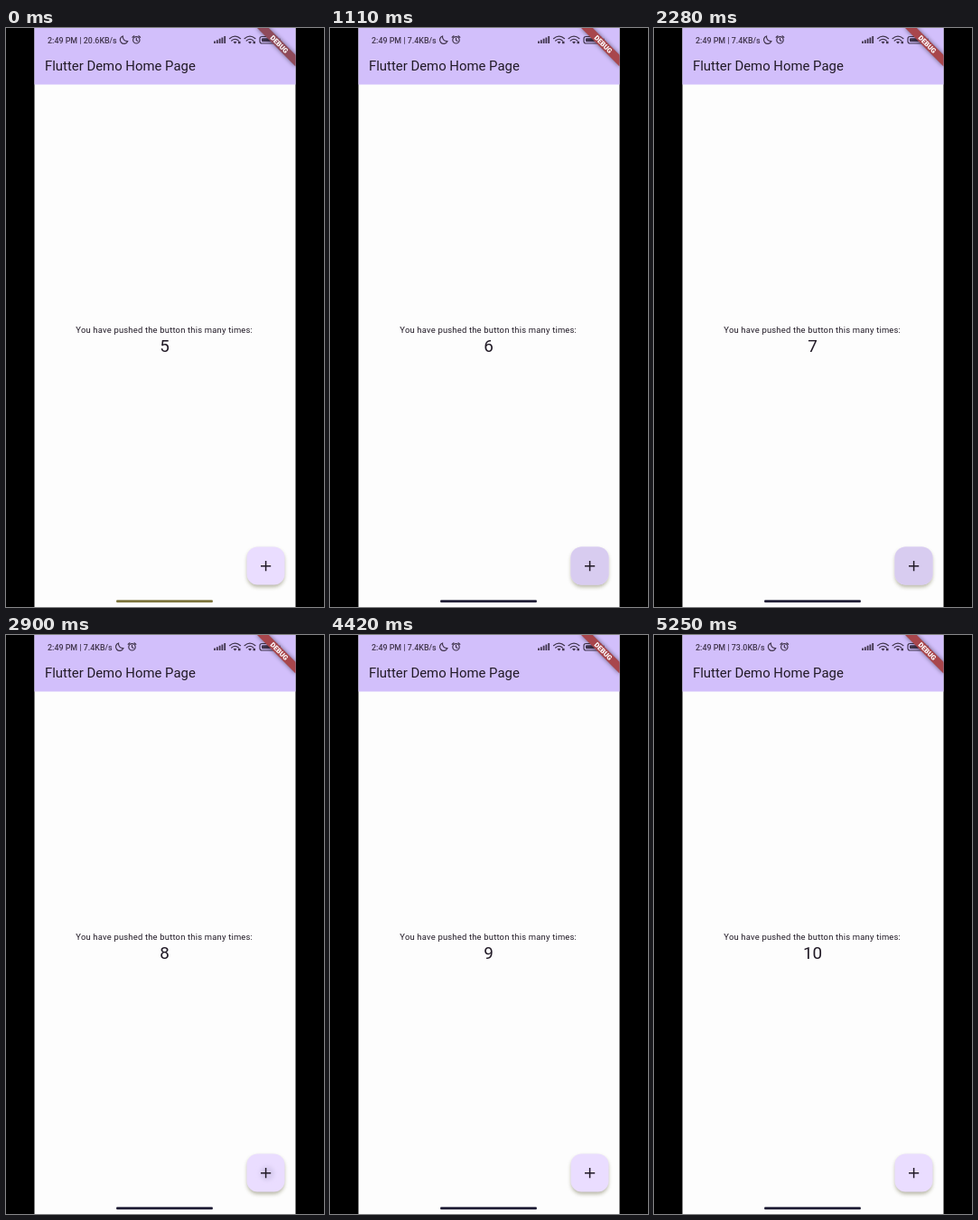
Animation, 352 px wide and 640 px high, one loop 5320 ms. Source, as an HTML page:

```html
<!DOCTYPE html>
<html lang="en">
<head>
<meta charset="utf-8">
<title>Counter demo</title>
<style>
html, body { margin: 0; width: 100%; height: 100%; overflow: hidden; background: #000; }
svg { display: block; width: 100vw; height: 100vh; font-family: Roboto, sans-serif; fill: #211a26; }
.line { fill: none; stroke: #41354d; stroke-width: 1.2; stroke-linecap: round; }
.bars { fill: none; stroke: #41354d; stroke-width: 1.8; }
.icon { fill: #41354d; }
</style>
</head>
<body>
<svg viewBox="0 0 352 640">
  <defs>
    <clipPath id="screen"><rect x="31.500" width="289" height="640"/></clipPath>
    <clipPath id="button"><rect x="266.500" y="573.500" width="42" height="42" rx="12"/></clipPath>
    <filter id="soft" x="-50%" y="-50%" width="200%" height="200%"><feGaussianBlur stdDeviation="2.2"/></filter>
    <filter id="glow" x="-50%" y="-150%" width="200%" height="400%"><feGaussianBlur stdDeviation="2.5"/></filter>
    <g id="wifi">
      <path class="line" d="M-6-3.600Q0-8.600 6-3.600M-3.800-1.300Q0-4.400 3.800-1.300"/>
      <path class="icon" d="M-2 .2Q0-1.400 2 .2L0 2.200ZM3.500-.5h2.500v2.500h-2.500z"/>
    </g>
  </defs>
  <rect width="352" height="640" fill="#000"/>
  <g clip-path="url(#screen)">
    <rect x="31" width="290" height="640" fill="#fdfdfd"/>
    <rect x="31" width="290" height="62.500" fill="#d2bffb"/>

    <text x="43" y="47.300" font-size="14.900">Flutter Demo Home Page</text>
    <text x="175.200" y="337" font-size="9.430" letter-spacing=".19" text-anchor="middle">You have pushed the button this many times:</text>
    <text id="count" x="175.500" y="358.200" font-size="18.900" text-anchor="middle"></text>

    <text id="status" class="icon" x="46" y="16.500" font-size="8.900" font-weight="500"></text>
    <g id="alerts">
      <path class="line" d="M4 9A4.300 4.300 0 1 0 9.300 14.700A5 5 0 0 1 4 9Z"/>
      <circle class="line" cx="19" cy="13.300" r="3.700"/>
      <path class="line" d="M19 11.300V13.500L20.500 14.400M14.700 10.300L16.500 8.800M23.300 10.300L21.500 8.800"/>
    </g>
    <path class="bars" d="M231 17V14.500M233.800 17V13.200M236.600 17V11.800M239.400 17V10.400M242.200 17V9"/>
    <use href="#wifi" x="253.500" y="15.300"/>
    <use href="#wifi" x="270" y="15.300"/>
    <rect class="line" x="281" y="9.500" width="19.500" height="7.500" rx="2.200"/>
    <rect class="icon" x="283" y="11.300" width="11.500" height="4" rx="1"/>
    <path class="line" d="M303 12V14.500"/>

    <!-- Ribbon across the top right corner -->
    <g transform="translate(320.500 0) rotate(45)">
      <rect x="-30" y="21" width="60" height="9" opacity=".5" fill="#000" filter="url(#glow)"/>
      <rect id="banner" x="-30" y="21" width="60" height="9"/>
      <text y="28.200" font-size="7.600" font-weight="900" text-anchor="middle" fill="#fff">DEBUG</text>
    </g>

    <rect x="267" y="576" width="41" height="42" rx="12" fill="#55522c" opacity=".42" filter="url(#soft)"/>
    <rect x="266.500" y="573.500" width="42" height="42" rx="12" fill="#eaddff"/>
    <g clip-path="url(#button)">
      <circle id="ripple" cx="289" cy="595" fill="#d8ccf0" filter="url(#soft)"/>
    </g>
    <path d="M282 594.700H293.200M287.600 589.100V600.300" stroke="#211a26" stroke-width="1.500"/>
    <rect id="home" x="122" y="632.300" width="107" height="2.700" rx="1.350"/>
  </g>
</svg>
<script>
const $ = id => document.getElementById(id);
const LOOP = 5320;
const presses = [820, 1990, 2830, 3360, 4650];
const clamp = x => Math.min(1, Math.max(0, x));
const mix = (a, b, p) => `rgb(${a.map((v, i) => v + (b[i] - v) * p)})`;

function draw(t) {
  $("count").textContent = 5 + presses.filter(p => t >= p + 60).length;

  const slow = t >= 820 && t < 4700;
  const speed = t < 820 ? "20.6" : slow ? "7.4" : "73.0";
  $("status").textContent = `2:49 PM | ${speed}KB/s`;
  $("alerts").setAttribute("transform", `translate(${slow ? 120.5 : 125.3} 0)`);

  // The touch ripple spreads out, then fades.
  const age = t - (presses.findLast(p => t >= p) ?? -LOOP);
  $("ripple").setAttribute("r", 6 + 34 * clamp(age / 290) ** 2);
  $("ripple").setAttribute("opacity", clamp((500 - age) / 200));

  const settle = clamp((t - 70) / 230);
  $("home").setAttribute("fill", mix([126, 118, 62], [34, 32, 56], settle));
  $("banner").setAttribute("fill", mix([143, 74, 90], [168, 70, 76], settle));
}

function tick() {
  draw(performance.now() % LOOP);
  requestAnimationFrame(tick);
}
tick();
</script>
</body>
</html>
```
